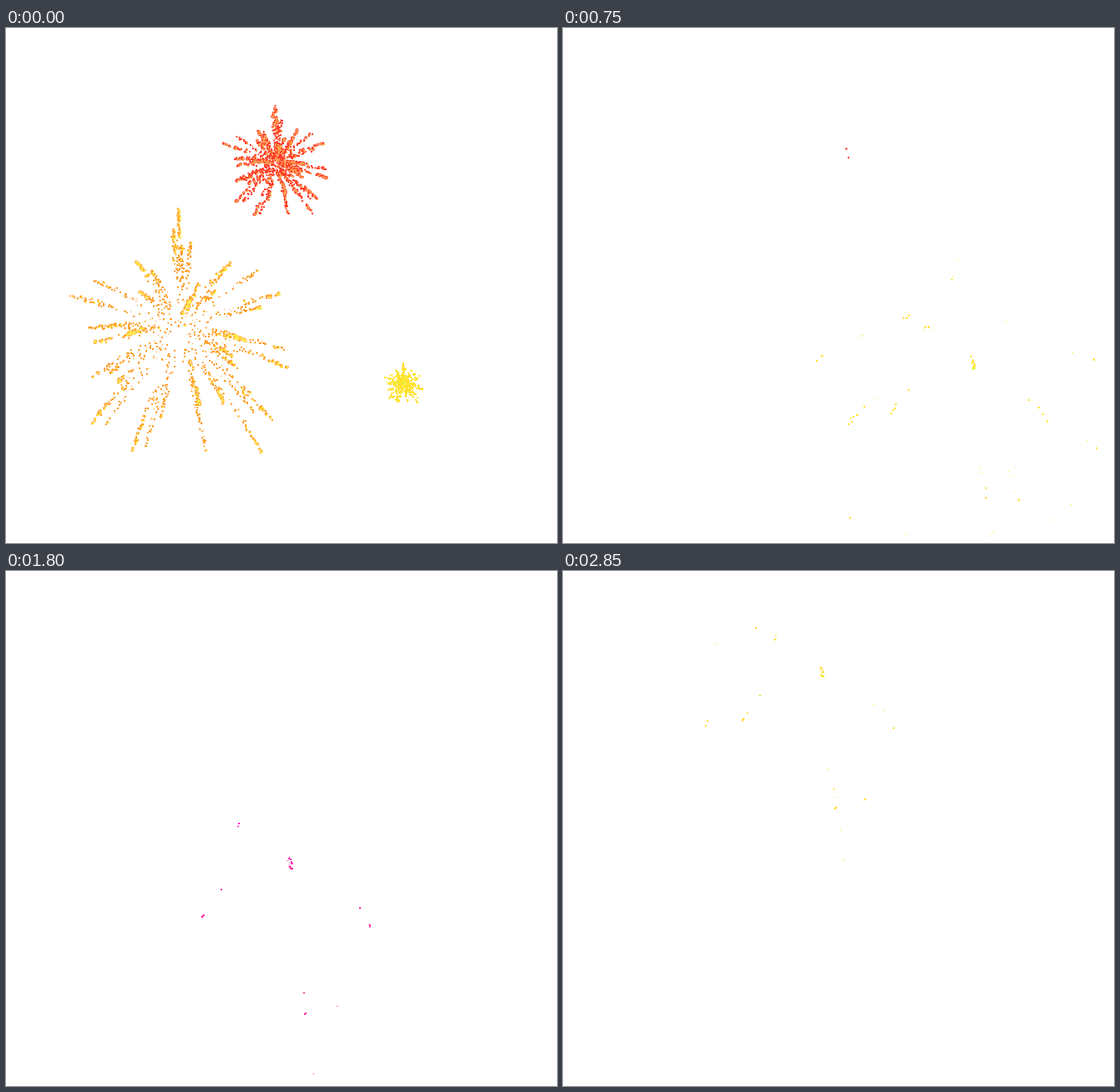
Animation of 660x616 px, one loop 3000 ms. Source, as an HTML page with a canvas:

```html
<!DOCTYPE html>
<html lang="en">
<head>
<meta charset="utf-8">
<title>Fireworks</title>
<style>
  html, body { margin: 0; width: 100%; height: 100%; overflow: hidden; background: #fff; }
  canvas { display: block; }
</style>
</head>
<body>
<canvas id="sky" width="660" height="616"></canvas>
<script>
const ctx = document.getElementById('sky').getContext('2d');
const LOOP = 3000, STEP = 150, GRAVITY = 75;

// Three waves; each one is cut off when the next begins
const WAVES = [
  { from: 0, to: 900, bursts: [
    { x: 207, y: 362, start: -390, hue: 33, size: 1.15 },
    { x: 323, y: 161, start: -185, hue: 6, size: .97 },
    { x: 475, y: 425, start: -65, hue: 52, size: .95 }
  ] },
  { from: 900, to: 1950, bursts: [
    { x: 175, y: 157, start: 558, hue: 270 },
    { x: 472, y: 229, start: 814, hue: 213 },
    { x: 323, y: 372, start: 940, hue: 322 }
  ] },
  { from: 1950, to: LOOP, bursts: [
    { x: 207, y: 384, start: 1860, hue: 76, size: 1.15 },
    { x: 294, y: 141, start: 2000, hue: 50, size: .9 },
    { x: 489, y: 296, start: 1780, hue: 137, light: 48 }
  ] }
];

// Leading rays: angle in degrees, speed in px/s
const LEADERS = [
  [-90, 315], [-93, 269], [-25, 271], [-158, 294], [-118, 215], [-57, 223],
  [-172, 125], [179, 203], [-75, 101], [-1, 159], [14, 273], [40, 289],
  [53, 329], [72, 161], [113, 287], [137, 284]
];
const FILLERS = 24, SPARKS = 150;

let seed = 20417;
function rand() {
  seed = (Math.imul(seed, 1664525) + 1013904223) >>> 0;
  return seed / 4294967296;
}

// Slow rays point at the viewer, so they look fatter and last longer
const sparks = [];
function addRay(angle, speed, scale, end) {
  const weight = (.5 + 200 / speed) * scale;
  for (let i = 0; i < SPARKS; i++) {
    sparks.push({
      vx: speed * Math.cos(angle),
      vy: speed * Math.sin(angle),
      born: .95 * Math.pow(rand(), 1.2),
      life: .08 + .34 * rand(),
      end: end * (.5 + .5 * rand()),
      jx: rand() - .5,
      jy: rand() - .5,
      r: (.6 + .7 * rand()) * Math.sqrt(weight)
    });
  }
}
for (const [deg, speed] of LEADERS) {
  addRay(deg * Math.PI / 180, speed, 1, Math.min(1, .75 + 24 / speed));
}
for (let i = 0; i < FILLERS; i++) {
  addRay(i * 2.4 + .2 * rand(), 130 + 140 * rand(), .6, .55 + .35 * rand());
}

const reach = age => 1 - Math.exp(-age / .68);

function dot(x, y, r) {
  if (r < 1) {
    const side = r < .65 ? 1 : 2;
    ctx.rect(Math.round(x), Math.round(y), side, side);
  } else {
    ctx.moveTo(x + r, y);
    ctx.arc(x, y, r, 0, 7);
  }
}

function drawDots(dots, colour) {
  ctx.fillStyle = colour;
  ctx.beginPath();
  for (const d of dots) dot(d.x, d.y, d.r);
  ctx.fill();
}

function drawBurst({ x, y, start, hue, size = 1, light = 58 }, t) {
  const age = (t - start) / 1000;
  if (age <= 0) return;
  const swell = Math.min(.4 + 5 * age, Math.max(.8, 1.5 - 1.1 * age));
  const dots = [];
  for (const s of sparks) {
    const past = age - s.born;
    if (past < 0 || past > s.life || age > s.end) continue;
    const c = s.born + .12 * past, p = reach(c), spread = 2 + 18 * past;
    dots.push({
      x: x + size * (s.vx * p + s.jx * spread),
      y: y + size * (s.vy * p + GRAVITY * c * c + s.jy * spread),
      r: s.r * size * swell * (1.15 - .55 * past / s.life)
    });
  }
  drawDots(dots, `hsl(${hue}, 100%, ${light}%)`);
  const cores = dots.filter(d => d.r > 1.3).map(d => ({ ...d, r: d.r - .7 }));
  drawDots(cores, `hsl(${hue + 20}, 100%, ${light + 8}%)`);
}

let shown = -1;
function tick() {
  const t = Math.floor(performance.now() % LOOP / STEP) * STEP;
  if (t !== shown) {
    shown = t;
    ctx.fillStyle = '#fff';
    ctx.fillRect(0, 0, 660, 616);
    const wave = WAVES.find(w => t >= w.from && t < w.to);
    for (const b of wave.bursts) drawBurst(b, t);
  }
  requestAnimationFrame(tick);
}
tick();
</script>
</body>
</html>
```
